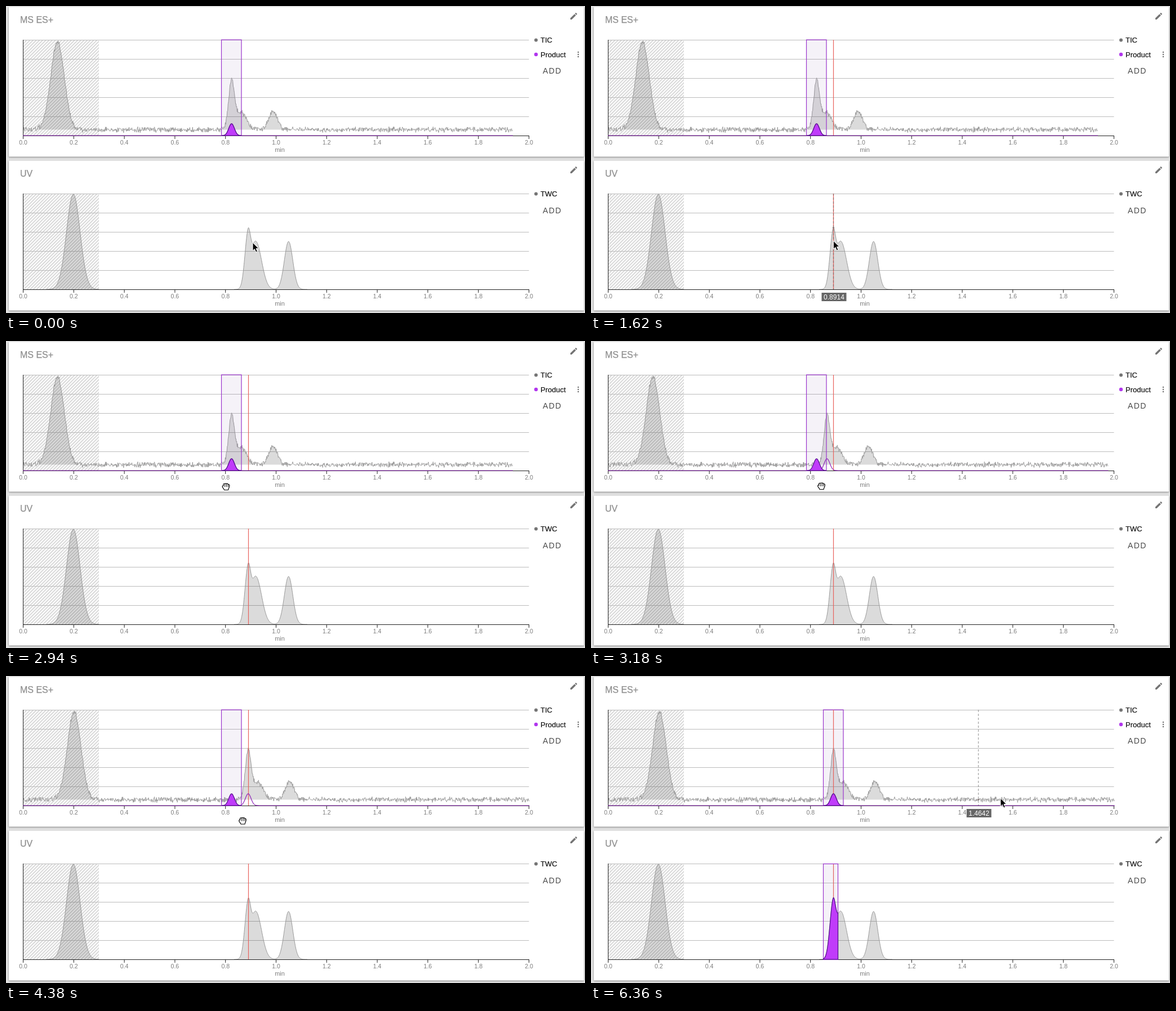
An HTML page that plays this animation: 1028 by 545 pixels, repeating every 6420 ms.

```html
<!DOCTYPE html>
<html lang="en">
<head>
<meta charset="utf-8">
<title>Chromatogram alignment</title>
<style>
  html, body { margin: 0; width: 100%; height: 100%; overflow: hidden; background: #e3e3e3; }
  svg { display: block; width: 1028px; height: 545px; font-family: "Liberation Sans", Arial, sans-serif; }
  .card { fill: #fff; filter: drop-shadow(0 1px 1.5px rgba(0,0,0,.45)); }
  .title { font-size: 16px; fill: #8f8f8f; stroke: #8f8f8f; stroke-width: .25; }
  .grid { stroke: #bcbcbc; }
  .axis { stroke: #222; fill: none; }
  .tick { font-size: 10.5px; fill: #7c7c7c; text-anchor: middle; }
  .unit { font-size: 11px; fill: #7c7c7c; text-anchor: middle; }
  .legend { font-size: 13px; fill: #111; stroke: #111; stroke-width: .2; }
  .add { font-size: 14px; letter-spacing: 1.4px; fill: #4a4a4a; }
  .icon { fill: #757575; }
  .peaks { fill: rgba(0,0,0,.14); }
  .trace { fill: none; stroke: #999; stroke-linejoin: round; }
  .range { fill: rgba(130,90,160,.08); stroke: #9a35cc; stroke-width: 1.2; }
  .product { fill: none; stroke: #8e24b8; stroke-width: 1.2; }
  .picked { fill: #c03cfa; stroke: #52118a; stroke-width: 1.2; }
  .marker { stroke: #e8625c; stroke-width: 1.2; }
  .guide { stroke: rgba(90,90,90,.5); stroke-width: 1.4; stroke-dasharray: 4 3; }
  .dot { fill: #8a7a7a; }
  .tag { fill: #666; }
  .value { font-size: 12px; fill: #fff; text-anchor: middle; }
</style>
</head>
<body>
<svg id="stage" viewBox="0 0 1028 545">
  <defs>
    <pattern id="hatch" width="4" height="4" patternUnits="userSpaceOnUse" patternTransform="rotate(45)">
      <rect width="2" height="4" fill="#d9d9d9"/>
    </pattern>
    <clipPath id="plot"><rect x="30" y="40" width="900.5" height="195"/></clipPath>
    <path id="pencil" transform="translate(1000 10) scale(.667)" d="M3 17.25V21h3.75L17.81 9.94l-3.75-3.75zM20.71 7.04c.39-.39.39-1.02 0-1.41l-2.34-2.34c-.39-.39-1.02-.39-1.41 0l-1.83 1.83 3.75 3.75z"/>
  </defs>
</svg>
<script>
const LOOP = 6420, STEP = 60, X0 = 30, PER_MIN = 449.25, UV_Y = 273;
const CLICK = 1380, GRAB = 2640, DROP = 5520, LET_GO = 5640;
const stage = document.getElementById('stage');

function add(parent, tag, attrs = {}, text) {
  const el = document.createElementNS('http://www.w3.org/2000/svg', tag);
  for (const k in attrs) el.setAttribute(k, attrs[k]);
  if (text !== undefined) el.textContent = text;
  parent.appendChild(el);
  return el;
}
const set = (el, attrs) => { for (const k in attrs) el.setAttribute(k, attrs[k]); };
const show = (el, on) => el.setAttribute('visibility', on ? 'visible' : 'hidden');

// Peaks: [centre, height, left sigma, right sigma]
const msPeaks = [[91.5, 156, 12, 12], [400.5, 86, 5.3, 5.3], [418.5, 30, 9, 9], [474.5, 33, 7.5, 7.5]];
const uvPeaks = [[119.5, 169, 12, 12], [429.5, 89, 5.6, 4.5], [443.5, 85, 8, 10.2], [501.7, 85, 7.5, 7.5]];
const productPeaks = [[400.5, 21, 5, 5]];
const height = (peaks, x) => peaks.reduce((sum, [c, h, l, r]) =>
  sum + h * Math.exp(-0.5 * ((x - c) / (x < c ? l : r)) ** 2), 0);

let seed = 7;
function random() {
  seed = (seed * 16807) % 2147483647;
  return seed / 2147483647;
}

function curve(peaks, from, to, base, step = 0.5, noise = 0) {
  let d = '';
  for (let x = from; x <= to; x += step) {
    const jitter = (random() + random() - 1) * noise;
    d += `${d ? 'L' : 'M'}${x.toFixed(2)} ${(base - height(peaks, x) + jitter).toFixed(2)}`;
  }
  return d;
}
const area = (peaks, from, to, base) =>
  `M${from} ${base}${curve(peaks, from, to, base).replace('M', 'L')}L${to} ${base}Z`;

function panel(title, y, name) {
  const g = add(stage, 'g', { transform: `translate(0 ${y})` });
  add(g, 'rect', { class: 'card', x: 5, y: 1.5, width: 1021, height: 266, rx: 1 });
  add(g, 'text', { class: 'title', x: 25, y: 30 }, title);
  add(g, 'use', { href: '#pencil', class: 'icon' });
  add(g, 'circle', { class: 'icon', cx: 941, cy: 60.5, r: 3 });
  add(g, 'text', { class: 'legend', x: 949, y: 65 }, name);
  add(g, 'rect', { x: 30, y: 60, width: 135, height: 170, fill: 'url(#hatch)' });
  for (let i = 0; i < 5; i++)
    add(g, 'path', { class: 'grid', d: `M30 ${60.5 + 34 * i}H928.5` });
  return g;
}

function axes(g) {
  let d = 'M30.5 60V230.5H928.5';
  for (let i = 0; i <= 10; i++) {
    const x = 30.5 + i * 89.8;
    d += `M${x} 230V236`;
    add(g, 'text', { class: 'tick', x, y: 245.5 }, (i / 5).toFixed(1));
  }
  add(g, 'path', { class: 'axis', d });
  add(g, 'text', { class: 'unit', x: 486, y: 259 }, 'min');
}

const marker = g => add(g, 'path', { class: 'marker', d: 'M430.5 60V230' });

function hoverGuide(g) {
  const el = add(g, 'g');
  add(el, 'path', { class: 'guide', d: 'M0 60V230' });
  const dot = add(el, 'circle', { class: 'dot', r: 1.6 });
  add(el, 'rect', { class: 'tag', x: -21, y: 236, width: 44, height: 15 });
  const value = add(el, 'text', { class: 'value', x: 1, y: 248 });
  return (x, on, y) => {
    show(el, on);
    if (!on) return;
    set(el, { transform: `translate(${x} 0)` });
    set(dot, { cy: y });
    value.textContent = ((x - X0) / PER_MIN).toFixed(4);
  };
}

// Mass spectrum panel
const ms = panel('MS ES+', 0, 'TIC');
add(ms, 'circle', { cx: 941, cy: 86, r: 3.2, fill: '#b135ee' });
add(ms, 'text', { class: 'legend', x: 949, y: 91 }, 'Product');
for (const cy of [82, 86, 90]) add(ms, 'circle', { class: 'icon', cx: 1016, cy, r: 1.3 });
add(ms, 'text', { class: 'add', x: 953, y: 120 }, 'ADD');
const ticPlot = add(ms, 'g', { 'clip-path': 'url(#plot)' });
const tic = add(ticPlot, 'g');
add(tic, 'path', { class: 'peaks', d: area(msPeaks, 55, 128, 219.5) + area(msPeaks, 382, 442, 219.5) + area(msPeaks, 454, 495, 219.5) });
add(tic, 'path', { class: 'trace', d: curve(msPeaks, -4, 900, 219.5, 0.7, 5.5) });
axes(ms);
const msRange = add(ms, 'rect', { class: 'range', y: 60, width: 35.5, height: 170 });
const msMarker = marker(ms);
const productPlot = add(ms, 'g', { 'clip-path': 'url(#plot)' });
const product = add(productPlot, 'path', { class: 'product', d: curve(productPeaks, -4, 900, 230) });
const msPicked = add(ms, 'path', { class: 'picked', d: area(productPeaks, 384, 417, 230) });
const msHover = hoverGuide(ms);

// UV panel
const uv = panel('UV', UV_Y, 'TWC');
add(uv, 'text', { class: 'add', x: 953, y: 94.5 }, 'ADD');
add(uv, 'path', { class: 'peaks', d: area(uvPeaks, 72, 165, 230) + area(uvPeaks, 405, 535, 230) });
add(uv, 'path', { class: 'trace', d: curve(uvPeaks, 72, 165, 230) + curve(uvPeaks, 405, 535, 230) });
axes(uv);
const uvMarker = marker(uv);
const uvPick = add(uv, 'g');
add(uvPick, 'rect', { class: 'range', x: 412.5, y: 60.5, width: 26, height: 170 });
add(uvPick, 'path', { class: 'picked', d: area(uvPeaks, 412.5, 438.5, 230) });
const uvHover = hoverGuide(uv);

// Pointers
const arrow = add(stage, 'path', {
  d: 'M0 0V14.5L3.4 11.4L5.8 17L8.4 15.9L6 10.4H10.5Z',
  fill: '#000', stroke: '#fff', 'stroke-linejoin': 'round'
});
const hand = add(stage, 'g', { fill: '#fff', stroke: '#000', 'stroke-width': 1.2, 'stroke-linejoin': 'round' });
add(hand, 'path', { d: 'M-3 6.5C-3.4 4.5-6.4 2.4-6.4 .2C-6.4-1.2-5-1.4-4.4-.8L-4.6-3C-4.6-5-2.2-5.2-1.8-3.9C-1.4-5.7 .8-5.6 1.1-4C1.6-5.4 3.6-5 3.9-3.2C5.2-3.8 6.4-2.8 6.3-1.2C6.3 1.8 4.4 3.6 4 6.5Z' });
add(hand, 'path', { d: 'M-1.8-3.4V1M1.1-3.6V1M3.9-2.8V1', fill: 'none', 'stroke-width': 1 });

// Pointer path: [time, x, y, easing into this point]
const smooth = p => p * p * (3 - 2 * p);
const easeOut = p => 1 - (1 - p) ** 2;
const path = [
  [0, 438, 420, smooth], [120, 438, 420, smooth], [600, 424.5, 418, smooth],
  [1260, 430.46, 417, smooth], [2040, 430.46, 417, smooth], [2580, 390.5, 258, smooth],
  [3000, 390.5, 258, smooth], [3420, 418, 256.5, easeOut], [4260, 420, 256.5, smooth],
  [5160, 420.5, 256.5, smooth], [5760, 420.5, 256.5, smooth], [6360, 727.05, 217, p => p ** 1.3]
];
function pointer(t) {
  const i = path.findIndex(p => p[0] > t);
  if (i < 0) return path[path.length - 1].slice(1, 3);
  const [t0, x0, y0] = path[i - 1], [t1, x1, y1, ease] = path[i];
  const p = ease((t - t0) / (t1 - t0));
  return [x0 + (x1 - x0) * p, y0 + (y1 - y0) * p];
}

function draw(t) {
  const [px, py] = pointer(t);
  const grabbing = t >= GRAB && t < LET_GO;
  const shift = t < GRAB ? 0 : Math.min(30, Math.max(0, pointer(Math.min(t, DROP))[0] - 390.5));
  const dropped = t >= DROP;
  const move = `translate(${shift} 0)`;
  const pickMove = dropped ? 30 : 0;

  set(tic, { transform: move });
  set(product, { transform: move });
  set(msRange, { x: 382.5 + pickMove });
  set(msPicked, { transform: `translate(${pickMove} 0)` });
  show(uvPick, dropped);
  show(msMarker, t >= CLICK);
  show(uvMarker, t >= CLICK);

  // The guide trails the pointer by one step.
  const [hx, hy] = pointer(Math.max(0, t - STEP));
  const live = t >= 180 && !grabbing;
  msHover(hx, live && hy > 60 && hy < 231, 219.5 - height(msPeaks, hx - shift));
  uvHover(hx, live && hy > 333 && hy < 504, 230 - height(uvPeaks, hx));

  show(arrow, !grabbing);
  show(hand, grabbing);
  set(grabbing ? hand : arrow, { transform: `translate(${px} ${py})` });
}

const start = performance.now();
function tick() {
  const t = (performance.now() - start) % LOOP;
  draw(Math.floor(t / STEP) * STEP);
  requestAnimationFrame(tick);
}
tick();
</script>
</body>
</html>
```
